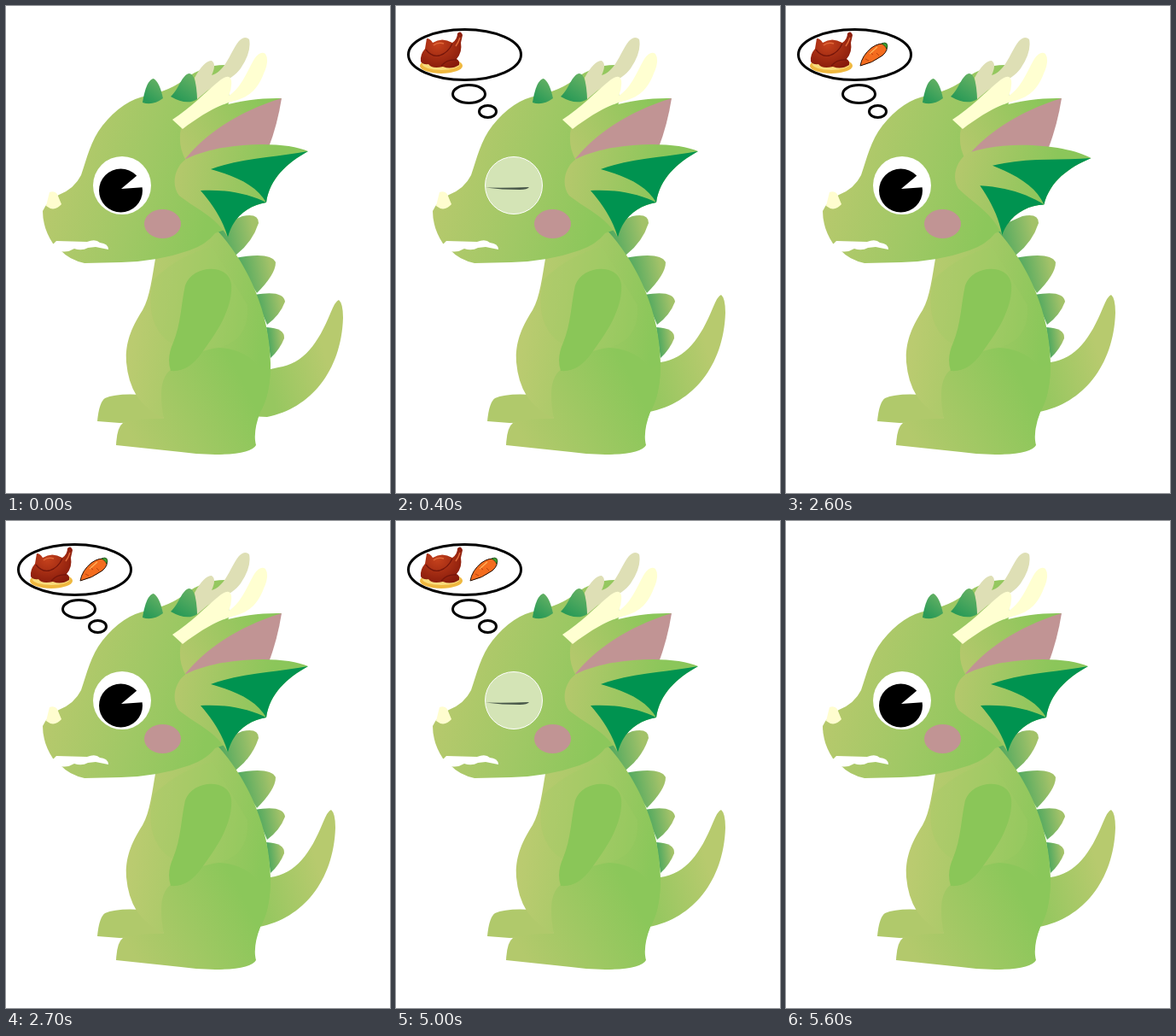
An HTML page that plays this animation: 450x570 px, repeating every 5700 ms.

```html
<!DOCTYPE html>
<html lang="en">
<head>
<meta charset="utf-8">
<title>Hungry little dragon</title>
<style>
  html, body { margin: 0; height: 100%; overflow: hidden; background: #fff; }
  svg { display: block; width: 100vw; height: 100vh; }
</style>
</head>
<body>
<svg viewBox="0 0 450 570">
  <defs>
    <linearGradient id="headFill" gradientUnits="userSpaceOnUse" x1="50" y1="205" x2="235" y2="255">
      <stop stop-color="#b7c96d"/><stop offset=".55" stop-color="#a0c865"/><stop offset="1" stop-color="#8cc75b"/>
    </linearGradient>
    <linearGradient id="earFill" gradientUnits="userSpaceOnUse" x1="200" y1="190" x2="310" y2="205">
      <stop stop-color="#b4c86c"/><stop offset="1" stop-color="#8bc65a"/>
    </linearGradient>
    <linearGradient id="topEarFill" gradientUnits="userSpaceOnUse" x1="204" y1="160" x2="300" y2="112">
      <stop stop-color="#b4c86c"/><stop offset="1" stop-color="#8bc65a"/>
    </linearGradient>
    <linearGradient id="bodyFill" gradientUnits="userSpaceOnUse" x1="150" y1="380" x2="300" y2="400">
      <stop stop-color="#bacb70"/><stop offset=".3" stop-color="#adca6a"/><stop offset="1" stop-color="#8ac75a"/>
    </linearGradient>
    <linearGradient id="legFill" gradientUnits="userSpaceOnUse" x1="145" y1="500" x2="275" y2="435">
      <stop stop-color="#b3c96c"/><stop offset="1" stop-color="#8bc75a"/>
    </linearGradient>
    <linearGradient id="tailFill" gradientUnits="userSpaceOnUse" x1="300" y1="440" x2="370" y2="420">
      <stop stop-color="#97c760"/><stop offset="1" stop-color="#b7ca6e"/>
    </linearGradient>
    <linearGradient id="spikeFill" x1=".1" y1=".55" x2=".9" y2=".4">
      <stop stop-color="#4ba75f"/><stop offset="1" stop-color="#a3c269"/>
    </linearGradient>
    <linearGradient id="bumpFill" x1=".2" y1="1" x2=".8" y2="0">
      <stop offset=".1" stop-color="#2a9a57"/><stop offset="1" stop-color="#68b264"/>
    </linearGradient>
    <radialGradient id="roastFill" cx=".4" cy=".35" r=".7">
      <stop stop-color="#c5411c"/><stop offset="1" stop-color="#861a0b"/>
    </radialGradient>
  </defs>

  <path id="tail" fill="url(#tailFill)" d="M275 425L310 417C340 413 357 388 371 354Q377 339 381 338Q386 342 386 359C384 421 348 465 297 475L275 474Z"/>

  <g fill="url(#spikeFill)">
    <path d="M243 261L277 246Q296 242 296 254Q289 276 270 291L266 293Z"/>
    <path d="M268 295Q310 287 316 300Q316 314 294 336Z"/>
    <path d="M291 338Q325 332 327 346Q321 362 306 373Z"/>
    <path d="M305 376Q327 377 326 389Q321 402 310 412Z"/>
  </g>

  <path fill="#b0c96b" d="M107 486Q109 464 116 459Q129 453 160 455L190 487L133 488Z"/>
  <path fill="url(#bodyFill)" d="M176 290C171 318 169 340 160 356C143 382 140 400 141 417Q143 440 153 456Q165 474 185 482L290 495L298 475Q310 455 310 418C309 352 278 294 245 260Z"/>
  <path fill="#9fc965" opacity=".3" d="M173 320C165 350 170 382 196 396L250 400Q286 390 283 350L242 282Q205 290 173 320Z"/>
  <path fill="url(#legFill)" d="M129 514Q130 493 137 488Q150 483 185 483C178 447 183 428 200 422Q224 402 250 400Q282 402 299 425L310 418Q310 455 298 475Q289 499 293 514Q287 525 245 525Q225 525 205 522Z"/>
  <path fill="#8ac658" d="M210 327C219 302 262 301 264 326C266 354 247 382 230 405Q214 429 193 427Q188 411 196 394C205 372 205 350 210 327Z"/>

  <path fill="url(#headFill)" d="M43 240Q48 228 62 221Q80 214 88 198C95 178 99 158 113 140Q137 110 165 105Q195 98 210 85Q232 69 257 69L262 110L240 180L256 262L245 266Q235 279 215 286Q178 299 135 300L92 301Q74 297 64 286L55 278Q43 260 43 240Z"/>
  <path fill="#fff" d="M50 279L55 279L59 275L95 276Q105 272 110 277Q120 278 120 285L105 282L96 283Q89 287 80 284Q72 289 64 287L55 288Z"/>
  <path fill="#fffdcf" d="M51 218Q57 216 60 220L65 232Q59 239 52 237L47 234Z"/>

  <path fill="#dedfb5" d="M221 84Q232 64 241 64Q247 68 241 81C258 76 263 53 273 41Q280 34 285 39Q288 54 275 73C265 87 249 90 236 99L224 109Z"/>
  <g fill="url(#bumpFill)">
    <path d="M160 113C162 100 166 86 173 85Q180 89 184 108Q172 117 160 113Z"/>
    <path d="M193 106C203 97 206 80 215 79Q223 80 224 109Q212 117 193 106Z"/>
  </g>
  <path fill="url(#topEarFill)" d="M205 143C235 117 280 107 323 108L260 165L211 181Q201 164 205 143Z"/>
  <path fill="#c19494" d="M323 108C274 123 235 148 210 179L270 180L308 165Q318 139 323 108Z"/>
  <path fill="#ffffd1" d="M195 133C217 119 233 101 252 86Q262 79 264 87Q265 96 261 105C276 96 283 75 291 62Q298 52 304 56Q309 64 302 79C296 95 287 106 268 111C245 117 226 130 207 144Z"/>

  <g id="ear">
    <path fill="url(#earFill)" d="M354 170C328 158 255 158 211 179C196 190 194 211 203 222C226 240 246 246 260 271C266 246 285 233 305 230C309 202 329 184 354 170Z"/>
    <path fill="#009350" d="M354 170C318 177 280 177 240 191C272 200 294 211 305 230C309 202 329 184 354 170ZM228 216C259 214 287 221 305 230C285 233 266 246 260 271C254 250 242 232 228 216Z"/>
  </g>

  <ellipse cx="183.5" cy="255" rx="21.5" ry="17" fill="#c19494"/>
  <g id="open">
    <circle cx="136" cy="210" r="34" fill="#fff"/>
    <circle cx="134.5" cy="216" r="25.5"/>
    <path fill="#fff" d="M135 214L154 198L163 212Z"/>
  </g>
  <g id="closed">
    <circle cx="138" cy="210" r="33.5" fill="#d4e4b6" stroke="#fff" stroke-width="1"/>
    <path fill="#49584a" d="M105 212.5Q132 213 156 212Q154 215 145 215Q124 215 105 212.5Z"/>
  </g>

  <g fill="#fff" stroke="#000" stroke-width="3">
    <ellipse id="small" cx="107.5" cy="123.5" rx="10" ry="7"/>
    <ellipse id="middle" cx="85.5" cy="103" rx="19" ry="10.5"/>
    <ellipse id="large" cx="80.5" cy="57" rx="66" ry="29.5"/>
  </g>
  <g id="roast">
    <ellipse cx="53" cy="70" rx="25" ry="9" fill="#efb83f"/>
    <ellipse cx="53" cy="68" rx="22" ry="7" fill="#f8dc7c"/>
    <path fill="url(#roastFill)" d="M29 65Q28 57 34 50L36 38Q40 38 43 43Q54 36 66 43Q72 39 72 32Q76 28 78 34L76 43Q78 54 71 62Q75 64 74 69Q65 75 55 71Q42 74 38 68Q32 69 29 65Z"/>
    <path fill="none" stroke="#74150a" stroke-width="1.3" d="M35 51Q42 60 51 58Q61 55 66 44M53 70Q60 62 71 63"/>
    <path fill="none" stroke="#e0693a" stroke-width="1.5" d="M44 46Q49 42 56 44M70 47Q73 43 75 37"/>
  </g>
  <g id="carrot">
    <path fill="#f46c1e" stroke="#241006" stroke-width="1" d="M87 70Q89 58 100 49Q110 42 117 45Q121 51 113 58Q101 67 87 70Z"/>
    <path fill="none" stroke="#bd430c" d="M98 54L102 57M93 62L97 64M106 55L109 58"/>
    <path fill="none" stroke="#ffae55" stroke-width="1.5" d="M98 56L107 48"/>
    <path fill="#3d9c2e" stroke="#173b12" stroke-width=".7" d="M112 44Q116 42 118 44Q120 47 118 50Q116 46 112 44Z"/>
  </g>
</svg>
<script>
  const $ = id => document.getElementById(id);
  const show = (id, on) => $(id).setAttribute("visibility", on ? "visible" : "hidden");
  const pose = (id, on, move) => $(id).setAttribute("transform", on ? move : "");

  // Each part is visible from its first tick up to its second; a tick is 100 ms.
  const spans = { small: [1, 56], middle: [2, 56], large: [3, 55], roast: [4, 54], carrot: [6, 53] };
  const blinks = [4, 50, 54], wags = [0, 2], flaps = [26, 28];

  function draw(now) {
    const tick = Math.floor(now % 5700 / 100);
    for (const [id, [from, to]] of Object.entries(spans)) show(id, tick >= from && tick < to);
    const blink = blinks.includes(tick);
    show("open", !blink);
    show("closed", blink);
    pose("tail", wags.includes(tick), "translate(9 6)");
    pose("ear", flaps.includes(tick), "rotate(6.2 281 207)");
  }

  const start = performance.now();
  function loop() {
    draw(performance.now() - start);
    requestAnimationFrame(loop);
  }
  loop();
</script>
</body>
</html>
```
